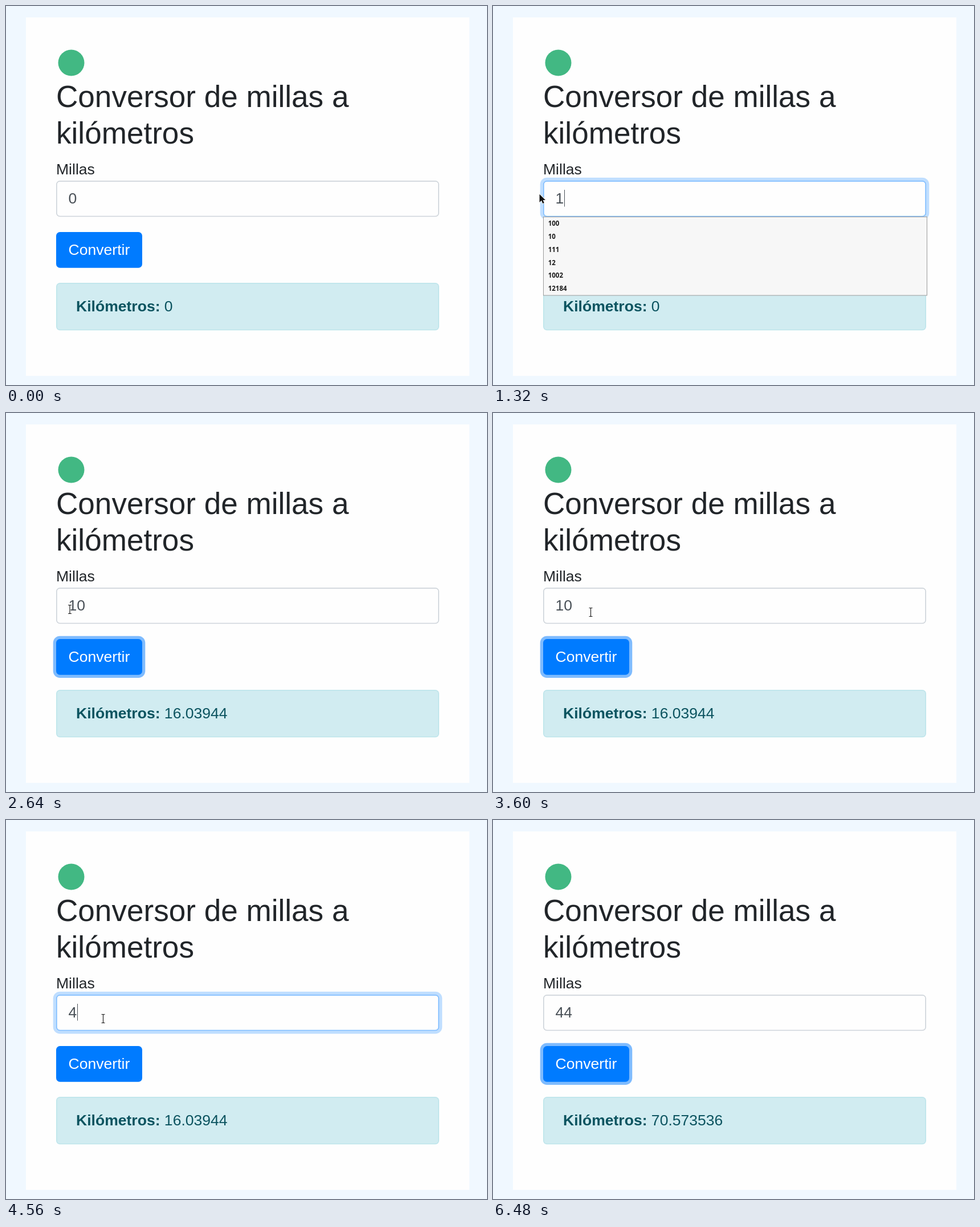
Recreate the animation shown at these times as an HTML page with a canvas. Size 844x664 px, loop 8.28 s.

```html
<!DOCTYPE html>
<html lang="es">
<head>
<meta charset="utf-8">
<title>Conversor de millas a kilómetros</title>
<style>
  html, body { margin: 0; width: 100%; height: 100%; overflow: hidden; background: #f0f8ff; }
  canvas { display: block; }
</style>
</head>
<body>
<canvas id="stage" width="844" height="664"></canvas>
<script>
const ctx = document.getElementById('stage').getContext('2d');
const LOOP = 8280;
const SANS = '"Liberation Sans", Arial, sans-serif';
const BASE = 26.55;
const BODY = `${BASE}px ${SANS}`;
const BOLD = `bold ${BASE}px ${SANS}`;
const TITLE = `${BASE * 2}px ${SANS}`;
const MENU = 'bold 11.5px "Noto Sans", "Open Sans", sans-serif';
const BLUE = '#007bff', HOVER = '#0069d9', PRESSED = '#0062cc';

const start = {
  value: '0', result: '0', selected: false, caret: false,
  inputFocus: 0, buttonFocus: 0, button: BLUE,
  menu: [], menuAlpha: 1, pointer: null
};
const ones = ['100', '10', '111', '12', '1002', '12184'];
const tens = ['100', '10', '1002'];

// Each entry holds the changes that take effect at its time.
const events = [
  [120, { pointer: ['arrow', 446, 392] }],
  [240, { pointer: ['beam', 125, 349] }],
  [600, { pointer: ['beam', 104, 343], inputFocus: .6, selected: true }],
  [720, { pointer: ['arrow', 81, 329], inputFocus: 1 }],
  [840, { menu: ['0'] }],
  [1320, { value: '1', selected: false, caret: true, menu: ones }],
  [1440, { value: '10', menu: tens }],
  [1920, { caret: false, inputFocus: .8, menuAlpha: .74 }],
  [2040, { inputFocus: .1, buttonFocus: .7, menuAlpha: .15 }],
  [2160, { inputFocus: 0, buttonFocus: 1, menu: [], menuAlpha: 1 }],
  [2400, { result: '16.03944' }],
  [2520, { pointer: ['arrow', 82, 331] }],
  [2640, { pointer: ['beam', 112, 344] }],
  [2760, { pointer: ['beam', 158, 349] }],
  [2880, { pointer: ['beam', 190, 352] }],
  [3000, { pointer: ['beam', 200, 353] }],
  [3240, { pointer: ['beam', 194, 352] }],
  [3360, { pointer: ['beam', 184, 351] }],
  [3480, { pointer: ['beam', 175, 350] }],
  [3600, { pointer: ['beam', 171.5, 349] }],
  [3720, { pointer: ['beam', 170.5, 348], inputFocus: .6, buttonFocus: .4, caret: true }],
  [3840, { inputFocus: 1, buttonFocus: 0 }],
  [4200, { value: '1', menu: ones }],
  [4320, { value: '', menuAlpha: .74 }],
  [4440, { value: '4', menuAlpha: .15 }],
  [4560, { menu: [], menuAlpha: 1 }],
  [4800, { value: '44' }],
  [5280, { pointer: ['beam', 169, 358] }],
  [5400, { pointer: ['arrow', 166, 384], caret: false }],
  [5520, { pointer: ['hand', 163, 414], button: HOVER }],
  [5640, { button: PRESSED, inputFocus: .4, buttonFocus: .6 }],
  [5760, { button: HOVER, inputFocus: 0, buttonFocus: 1, result: '70.573536' }],
  [6000, { pointer: ['arrow', 140, 500], button: BLUE }],
  [6120, { pointer: ['arrow', 30, 380] }],
  [6240, { pointer: ['arrow', 180, 180] }],
  [6360, { pointer: ['arrow', 590, 66] }],
  [6480, { pointer: null }]
];

function stateAt(time) {
  const past = events.filter(([at]) => at <= time).map(([, change]) => change);
  return Object.assign({}, start, ...past);
}

function text(string, x, y, font, color) {
  ctx.font = font;
  ctx.fillStyle = color;
  ctx.fillText(string, x, y);
  return ctx.measureText(string).width;
}

function roundBox(x, y, w, h, r, color) {
  ctx.fillStyle = color;
  ctx.beginPath();
  ctx.roundRect(x, y, w, h, r);
  ctx.fill();
}

function bordered(x, y, w, h, fill, border) {
  const b = 1.66;
  roundBox(x, y, w, h, 6.6, border);
  roundBox(x + b, y + b, w - 2 * b, h - 2 * b, 6.6 - b, fill);
}

function glow(x, y, w, h, focus, alpha) {
  const s = 5.3 * focus;
  if (s) roundBox(x - s, y - s, w + 2 * s, h + 2 * s, 6.6 + s, `rgba(0,123,255,${alpha * focus})`);
}

function mix(from, to, p) {
  return `rgb(${from.map((c, i) => Math.round(c + (to[i] - c) * p))})`;
}

function drawPage() {
  ctx.fillStyle = '#f0f8ff';
  ctx.fillRect(0, 0, 844, 664);
  ctx.fillStyle = '#fefefe';
  ctx.fillRect(35, 20, 778, 628);
  roundBox(91.5, 76.5, 46, 46, 23, '#42b883');
  text('Conversor de millas a', 88, 177, TITLE, '#212529');
  text('kilómetros', 88, 241, TITLE, '#212529');
  text('Millas', 88, 295, BODY, '#212529');
}

function drawInput({ value, inputFocus, selected, caret }) {
  const box = [88, 306, 672, 63.3];
  glow(...box, inputFocus, .25);
  bordered(...box, '#fefefe', mix([206, 212, 218], [128, 189, 255], inputFocus));
  if (selected) {
    ctx.fillStyle = '#c8a964';
    ctx.fillRect(110, 322, 14.5, 29.5);
  }
  const width = text(value, 109.6, 346, BODY, selected ? '#fefefe' : '#495057');
  if (caret) {
    ctx.fillStyle = '#495057';
    ctx.fillRect(Math.round(110 + width), 322, 1, 29.5);
  }
}

function drawButton({ button, buttonFocus }) {
  const box = [88, 396, 151, 62.7];
  glow(...box, buttonFocus, .5);
  roundBox(...box, 6.6, button);
  text('Convertir', 109.6, 436, BODY, '#fff');
}

function drawResult({ result }) {
  bordered(88, 485, 672, 83.3, '#d1ecf1', '#bee5eb');
  const width = text('Kilómetros:', 123, 535, BOLD, '#0c5460');
  text(' ' + result, 123 + width, 535, BODY, '#0c5460');
}

function drawMenu({ menu, menuAlpha }) {
  if (!menu.length) return;
  ctx.save();
  ctx.globalAlpha = menuAlpha;
  ctx.translate(425, 369.5);
  ctx.scale(1 - .05 * (1 - menuAlpha), 1);
  ctx.translate(-425, -369.5);
  const h = menu.length * 22.7 + 1.3;
  ctx.fillStyle = '#f7f7f7';
  ctx.fillRect(88.5, 369.5, 673, h);
  ctx.strokeStyle = '#9b9b9b';
  ctx.lineWidth = 1;
  ctx.strokeRect(88.5, 369.5, 673, h);
  menu.forEach((item, i) => text(item, 96.7, 385.4 + i * 22.7, MENU, '#1a1a1a'));
  ctx.restore();
}

const shapes = {
  arrow: new Path2D('M.6 .8V15L4 11.8L6.3 17L8.8 15.9L6.6 10.9H11Z'),
  beam: new Path2D('M-3-7.5H-.8L0-6.8L.8-7.5H3M0-6.8V6.8M-3 7.5H-.8L0 6.8L.8 7.5H3'),
  hand: new Path2D('M-1.2 0Q0-1 1 0L1.4 4L7 5.2Q8.4 5.6 8.2 7.5L7.4 13.5H.2L-3.6 8.8Q-3.8 7-1 8.2Z')
};

function drawPointer({ pointer }) {
  if (!pointer) return;
  const [kind, x, y] = pointer;
  const line = kind === 'beam';
  ctx.save();
  ctx.translate(x, y);
  ctx.lineJoin = 'round';
  ctx.strokeStyle = '#fff';
  ctx.lineWidth = line ? 3 : 1.8;
  ctx.stroke(shapes[kind]);
  if (line) {
    ctx.strokeStyle = '#222';
    ctx.lineWidth = 1.2;
    ctx.stroke(shapes[kind]);
  } else {
    ctx.fillStyle = '#111';
    ctx.fill(shapes[kind]);
  }
  ctx.restore();
}

function frame() {
  const state = stateAt(performance.now() % LOOP);
  drawPage();
  for (const draw of [drawInput, drawButton, drawResult, drawMenu, drawPointer]) draw(state);
  requestAnimationFrame(frame);
}
frame();
</script>
</body>
</html>
```
